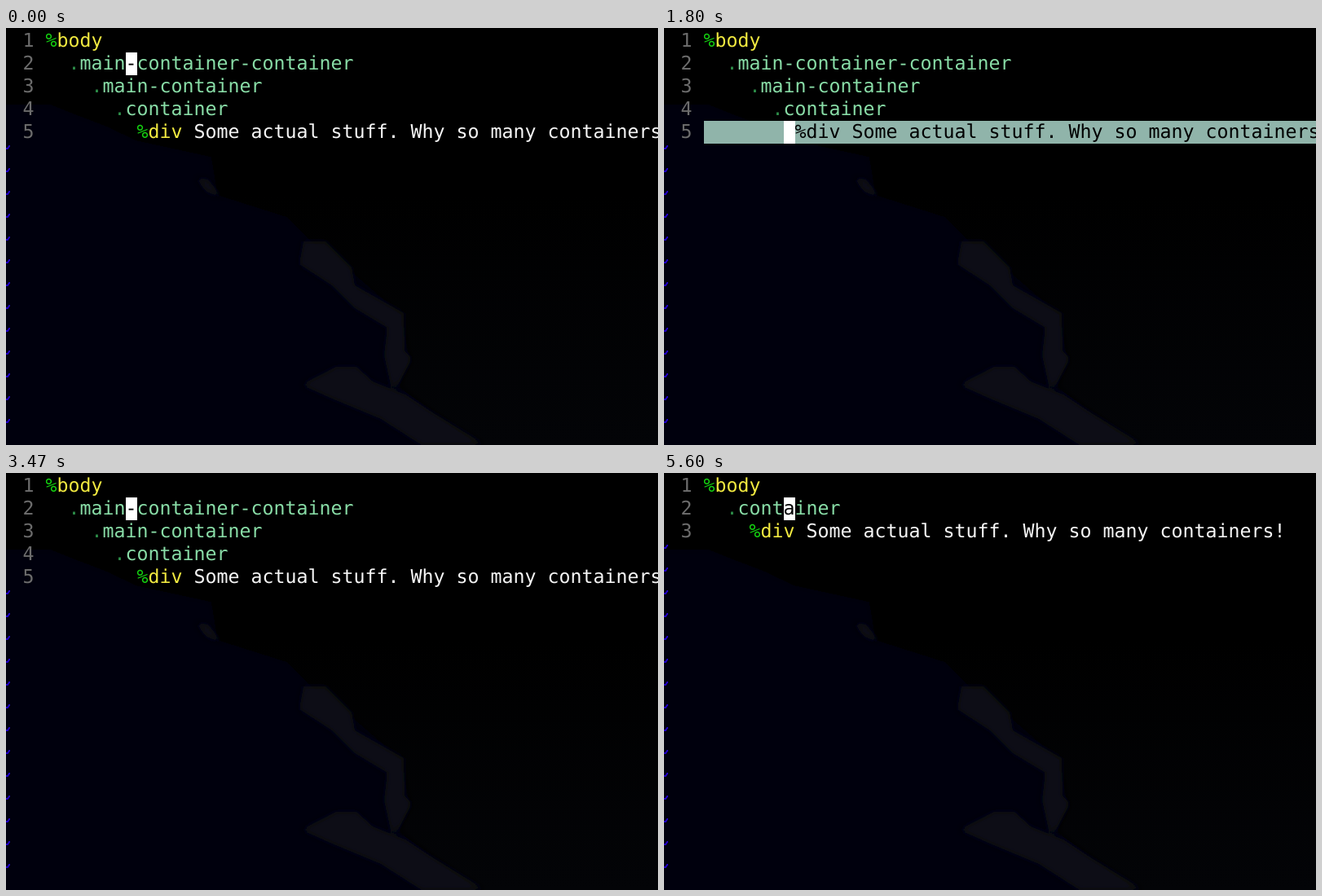
Write an HTML page that moves like this. It is 800 by 512 pixels and loops after 5.74 s.

```html
<!DOCTYPE html>
<html lang="en">
<head>
<meta charset="utf-8">
<title>Unnesting containers</title>
<style>
  html, body { margin: 0; width: 100%; height: 100%; overflow: hidden; background: #000; }
  #stage { position: relative; width: 800px; height: 512px; overflow: hidden; background: #000; }
  #stage svg { position: absolute; left: 0; top: 0; }
  .row, .num, .cursor {
    position: absolute; height: 28px; white-space: pre;
    font: 23.254px/28px "DejaVu Sans Mono", "Liberation Mono", monospace;
    font-variant-ligatures: none; text-rendering: geometricPrecision;
  }
  .row { left: 49px; width: 751px; color: #f6f6f6; overflow: hidden; text-indent: -.5px; }
  .num { left: 20.5px; color: #6c6c6c; }
  .cursor { left: 147px; width: 14px; background: #fff; color: #000; text-indent: -.5px; }
  .mark { color: #14d010; }
  .tag { color: #f2ea40; }
  .dot { color: #2c8c48; }
  .cls { color: #88dca6; }
  .sel { background: #90b4aa; }
  .sel span { color: #000; }
</style>
</head>
<body>
<div id="stage">
  <svg width="800" height="512">
    <defs>
      <linearGradient id="haze" x1="0" y1="0" x2="0" y2="1">
        <stop offset=".4" stop-color="#000"/>
        <stop offset="1" stop-color="#030407"/>
      </linearGradient>
      <filter id="soft"><feGaussianBlur stdDeviation="4"/></filter>
    </defs>
    <rect width="800" height="512" fill="url(#haze)"/>
    <path fill="#020509" filter="url(#soft)" d="M-20 94 L55 94 L80 104 L122 120 L160 138 L252 158 L260 205
      L345 232 L375 262 L425 300 L485 352 L495 405 L482 440 L600 530 H-20Z"/>
    <g fill="#0b1112" filter="url(#soft)">
      <path d="M232 184 L248 186 L266 209 L246 201Z"/>
      <path d="M365 262 L392 262 L424 294 L428 316 L488 350 L489 396 L498 406 L480 440 L472 438
        L464 402 L468 368 L428 344 L400 316 L360 290Z"/>
      <path d="M362 438 L405 416 L430 416 L450 434 L490 450 L520 470 L588 512 L510 512 L460 480 L400 455Z"/>
    </g>
    <g id="tildes" fill="none" stroke="#2000c8" stroke-width="2"></g>
  </svg>
  <div id="text"></div>
</div>
<script>
const LOOP = 5740, PITCH = 28, TOP = 2, ROWS = 18, COL = 7;
const DIV = '%div Some actual stuff. Why so many containers!';
const nest = (...lines) => lines.map((s, i) => '  '.repeat(i) + s);
const DOCS = [
  nest('%body', '.main-container-container', '.main-container', '.container', DIV),
  nest('%body', '.main-container', '.container', DIV),
  nest('%body', '.container', DIV)
];
// start time, document, cursor row, line selected
const STEPS = [
  [0, 0, 1, false],
  [400, 0, 2, false],
  [870, 0, 3, false],
  [1330, 0, 4, false],
  [1730, 0, 4, true],
  [2130, 0, 4, false],
  [2530, 0, 3, false],
  [2800, 0, 2, false],
  [3130, 0, 1, false],
  [3600, 1, 1, false],
  [4330, 2, 1, false]
];

const text = document.getElementById('text');
const tildes = document.getElementById('tildes');
const rowY = i => TOP + i * PITCH;
const span = (cls, s) => `<span class="${cls}">${s}</span>`;
const block = (cls, row, s) => `<div class="${cls}" style="top:${rowY(row)}px">${s}</div>`;

function paint(line) {
  const [, pad, mark, name, rest] = line.match(/^( *)([%.])([\w-]+)(.*)$/);
  const tag = mark === '%';
  return pad + span(tag ? 'mark' : 'dot', mark) + span(tag ? 'tag' : 'cls', name) + span('', rest);
}

function render([, doc, row, selected]) {
  const lines = DOCS[doc];
  text.innerHTML = lines.map((line, i) =>
    block('num', i, i + 1) +
    block(selected && i === row ? 'row sel' : 'row', i, paint(line))
  ).join('') + block('cursor', row, lines[row][COL]);

  let marks = '';
  for (let i = lines.length; i < ROWS; i++)
    marks += `<path d="M0 ${rowY(i) + 6}h2l2-3h1"/>`;
  tildes.innerHTML = marks;
}

let shown = null;
const start = performance.now();
function tick() {
  const t = (performance.now() - start) % LOOP;
  const step = STEPS.filter(s => s[0] <= t).pop();
  if (step !== shown) render(shown = step);
  requestAnimationFrame(tick);
}
tick();
</script>
</body>
</html>
```
